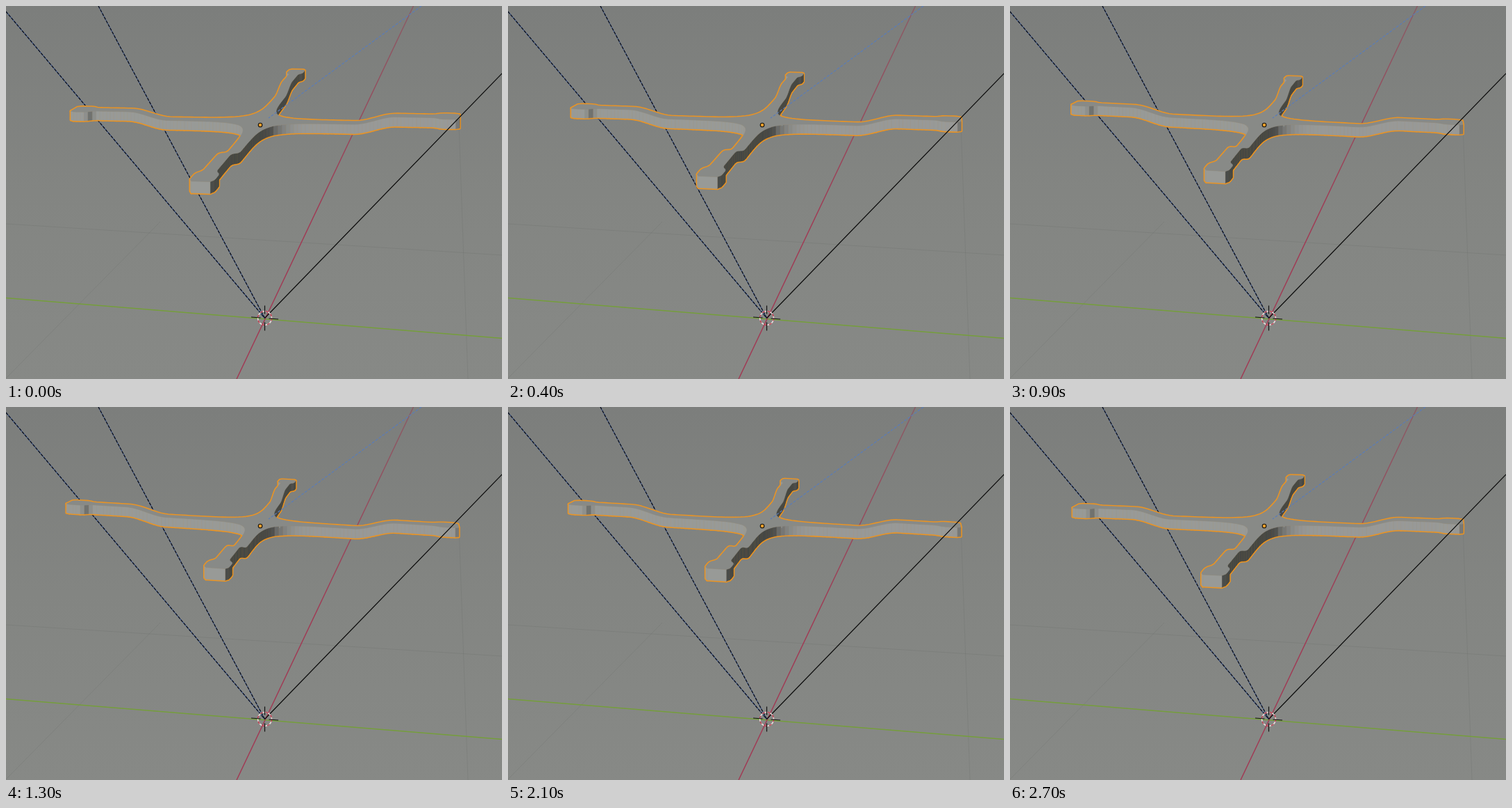
An HTML page with a canvas that plays this animation: 714x536 px, repeating every 2800 ms.

```html
<!DOCTYPE html>
<html lang="en">
<head>
<meta charset="utf-8">
<title>Rotating shape in a 3D viewport</title>
<style>
html, body { margin: 0; width: 100%; height: 100%; overflow: hidden; background: #848683; }
canvas { display: block; }
</style>
</head>
<body>
<canvas id="view" width="714" height="536"></canvas>
<script>
const ctx = document.getElementById('view').getContext('2d');
const LOOP = 2800, STEP = 100, PEAK = 1450;
const ORIGIN = [366, 171], CURSOR = [372.5, 448.5];
const THICK = 13, CORE = .0862;

const mix = (a, b, t) => a + (b - a) * t;
const smooth = (a, b, x) => {
  const t = Math.min(1, Math.max(0, (x - a) / (b - a)));
  return t * t * (3 - 2 * t);
};

// Swings quickly to the far pose, then eases part of the way back
function turnAt(t) {
  return t < PEAK
    ? 1 - (1 - t / PEAK) ** 1.22
    : 1 - .52 * ((t - PEAK) / 1250) ** 2.3;
}

// Arm profile at distance s from the centre: fillet, bar, rounded foot
function halfWidth(s) {
  const tip = Math.max(0, (s - .97) / .03);
  return .028 + .2 * Math.exp(-s / .07) + .022 * smooth(.87, .92, s) - .012 * tip * tip;
}
const height = s => 6 + 11.5 * smooth(.48, .69, s);

// Plan of the shape: the same arm four times, a quarter turn apart
function buildPlan() {
  const plan = [], n = 48;
  for (let arm = 0; arm < 4; arm++) {
    const c = Math.round(Math.cos(arm * Math.PI / 2)), d = Math.round(Math.sin(arm * Math.PI / 2));
    for (const side of [-1, 1]) {
      for (let i = 0; i <= n; i++) {
        const s = mix(CORE, 1, (side < 0 ? i : n - i) / n), w = side * halfWidth(s);
        plan.push({ a: s * c - w * d, b: s * d + w * c, z: height(s) });
      }
    }
  }
  return plan;
}
const plan = buildPlan();

// Perspective view of the turned plan axes
function project({ a, b, z }, turn) {
  const w = 1 - mix(.034, .018, turn) * a - .23 * b;
  const x = a * mix(277, 280, turn) + b * mix(-66, -48.5, turn);
  const y = a * mix(6, 18, turn) + b * mix(80, 63, turn);
  return [ORIGIN[0] + x / w, ORIGIN[1] + (y - z) / w];
}

function polygon(points) {
  const path = new Path2D();
  points.forEach(p => path.lineTo(...p));
  path.closePath();
  return path;
}

// Sides facing front or left are light, those facing right are dark
function sideColor(p, q) {
  const na = q.b - p.b, nb = p.a - q.a, len = Math.hypot(na, nb) || 1;
  const g = na > 0 ? 70 + 82 * Math.max(0, nb / len) ** 4 : 152;
  return `rgb(${g},${g + 1.5},${g - 1})`;
}

function drawBody(turn) {
  const top = plan.map(p => project(p, turn));
  const low = plan.map(p => project({ ...p, z: p.z - THICK }, turn));
  const faces = [];
  plan.forEach((p, i) => {
    const j = (i + 1) % plan.length;
    if (top[j][0] < top[i][0]) {
      faces.push({ path: polygon([top[i], top[j], low[j], low[i]]), color: sideColor(p, plan[j]) });
    }
  });
  faces.push({ path: polygon(top), color: '#888a87' });

  ctx.lineJoin = 'round';
  ctx.strokeStyle = '#ed9420';
  ctx.lineWidth = 3.6;
  faces.forEach(f => ctx.stroke(f.path));
  ctx.lineWidth = .6;
  for (const f of faces) {
    ctx.fillStyle = ctx.strokeStyle = f.color;
    ctx.fill(f.path);
    ctx.stroke(f.path);
  }
}

function line(x1, y1, x2, y2, color, width = 1, dash = []) {
  ctx.strokeStyle = color;
  ctx.lineWidth = width;
  ctx.setLineDash(dash);
  ctx.beginPath();
  ctx.moveTo(x1, y1);
  ctx.lineTo(x2, y2);
  ctx.stroke();
  ctx.setLineDash([]);
}

function ring(x, y, r, color, width, dash = []) {
  ctx.strokeStyle = color;
  ctx.lineWidth = width;
  ctx.setLineDash(dash);
  ctx.beginPath();
  ctx.arc(x, y, r, 0, 7);
  ctx.stroke();
  ctx.setLineDash([]);
}

function fadeDown(end, ...colors) {
  const g = ctx.createLinearGradient(0, 0, 0, end);
  colors.forEach((c, i) => g.addColorStop(i / (colors.length - 1), c));
  return g;
}

function drawScene() {
  ctx.fillStyle = fadeDown(536, '#7c7e7c', '#838582', '#878986');
  ctx.fillRect(0, 0, 714, 536);

  const grid = 'rgba(105,110,105,.28)';
  line(0, 313, 714, 358, grid);
  line(222, 310, 0, 535, grid);
  line(652, 170, 665, 536, grid);

  line(0, 419.5, 714, 477.5, '#759e3b', 1.4);
  line(586.5, 0, 332, 536, fadeDown(300, '#8b5b65', '#a03a54'), 1.5);

  for (const [x, y] of [[0, 8], [133, 0]]) {
    line(x, y, ...CURSOR, '#40588a', 1.2);
    line(x, y, ...CURSOR, '#0a0d16', 1.2, [4, 2]);
  }
}

function drawOverlay() {
  line(598, 0, 378, 161, '#5a7cb8', 1.2, [4, 2]);
  line(714, 97, ...CURSOR, '#0b0b0b', 1.2);

  ctx.fillStyle = '#f0a02c';
  ctx.beginPath();
  ctx.arc(...ORIGIN, 2.8, 0, 7);
  ctx.fill();
  ring(...ORIGIN, 2.8, '#15120c', 1.1);

  ring(...CURSOR, 10, '#e9dede', 1.5);
  ring(...CURSOR, 10, '#b8384b', 1.5, [4, 4]);
  const [x, y] = CURSOR;
  for (const dir of [-1, 1]) {
    line(x, y + 6 * dir, x, y + 18 * dir, '#111', 1.2);
    line(x + 6 * dir, y + .5 * dir, x + 19.5 * dir, y + 1.5 * dir, '#111', 1.2);
  }
}

function frame() {
  const t = Math.floor(performance.now() % LOOP / STEP) * STEP;
  drawScene();
  drawBody(turnAt(t));
  drawOverlay();
  requestAnimationFrame(frame);
}
frame();
</script>
</body>
</html>
```
